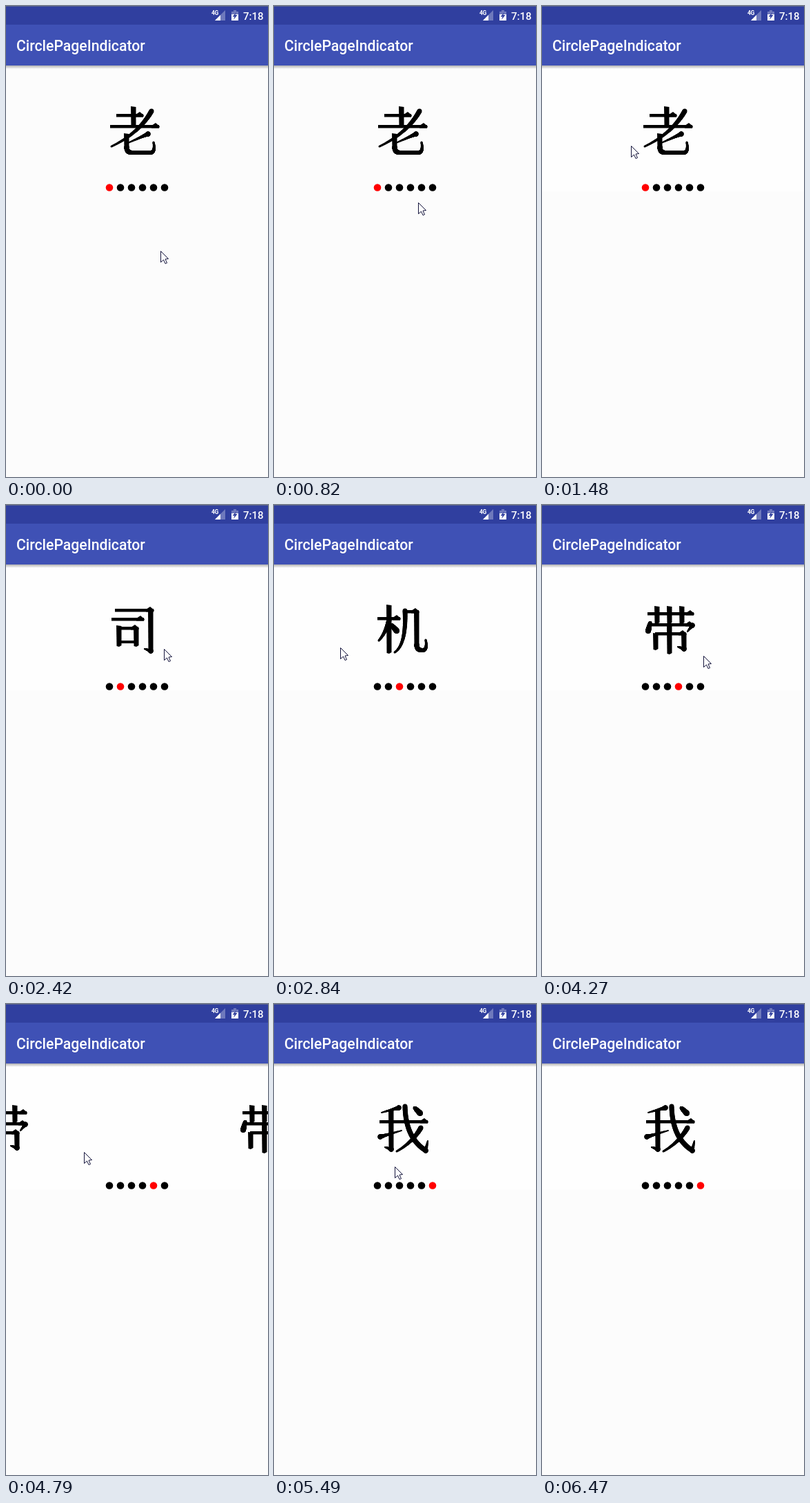
An HTML page with a canvas that plays this animation: 380 px wide and 681 px high, repeating every 7.64 s.

```html
<!DOCTYPE html>
<html lang="en">
<head>
<meta charset="utf-8">
<title>CirclePageIndicator</title>
<style>
  html, body { margin: 0; width: 100%; height: 100%; overflow: hidden; background: #fcfcfc; }
  canvas { position: absolute; left: 0; top: 0; display: block; }
  .label { position: absolute; color: #fff; white-space: nowrap; line-height: 1; font-family: Roboto, sans-serif; font-weight: 500; }
  #title { left: 15px; top: 47px; font-size: 21.2px; }
  #clock { left: 344px; top: 8px; font-size: 15px; }
  #net { left: 298px; top: 6px; font-size: 8.5px; font-weight: 700; letter-spacing: -0.5px; }
</style>
</head>
<body>
<canvas id="stage" width="380" height="681" role="img" aria-label="老司机带带我"></canvas>
<div class="label" id="title">CirclePageIndicator</div>
<div class="label" id="net">4G</div>
<div class="label" id="clock">7:18</div>
<script>
const W = 380, H = 681, LOOP = 7640, STEP = 140, SLIDE = 200;
const ctx = document.getElementById('stage').getContext('2d');

// The screen refreshes in bursts: [first, last]
const bursts = [[400, 1360], [1480, 2050], [2420, 3380], [3540, 4270], [4550, 5490], [5630, 6470]];
const slides = [1468, 2460, 3590, 4580, 5299];

// Turning points of the pointer: [time, x, y]
const turns = [
  [260, 224, 354], [810, 209, 284], [1360, 257, 214], [1480, 129, 202], [2050, 284, 212],
  [2420, 229, 208], [2800, 95, 206], [3380, 257, 210], [3540, 134, 204], [4270, 234, 218],
  [4720, 110, 214], [5100, 250, 224], [5490, 175, 235], [5910, 345, 460], [6470, 285, 700]
];

const ease = f => { f = Math.min(1, Math.max(0, f)); return f * f * (3 - 2 * f); };
const mix = (a, b, f) => a + (b - a) * f;

// Time of the latest screen refresh
function refresh(time) {
  const burst = bursts.filter(b => b[0] <= time).pop();
  if (!burst) return 0;
  const [a, b] = burst, n = Math.round((b - a) / STEP), gap = (b - a) / n;
  return Math.round((a + Math.min(n, Math.floor((time - a) / gap + .02)) * gap) / 10) * 10;
}

function pointerAt(t) {
  const i = Math.max(1, turns.findIndex(k => k[0] > t));
  if (t >= turns[turns.length - 1][0]) return [0, H + 20];
  const [t0, x0, y0] = turns[i - 1], [t1, x1, y1] = turns[i];
  const f = ease((t - t0) / (t1 - t0));
  return [mix(x0, x1, f), mix(y0, y1, f)];
}

const scrollAt = t => slides.reduce((sum, s) => sum + W * ease((t - s) / SLIDE), 0);

function poly(color, ...p) {
  ctx.fillStyle = color;
  ctx.beginPath();
  for (let i = 0; i < p.length; i += 2) ctx.lineTo(p[i], p[i + 1]);
  ctx.closePath();
  ctx.fill();
}

function rect(color, x, y, w, h) {
  ctx.fillStyle = color;
  ctx.fillRect(x, y, w, h);
}

function disc(color, x, y, r) {
  ctx.fillStyle = color;
  ctx.beginPath();
  ctx.arc(x, y, r, 0, Math.PI * 2);
  ctx.fill();
}

// Brush strokes of the characters
function brush(w0, w1, x0, y0, cx, cy, x1, y1) {
  for (let f = 0; f <= 1; f += 1 / 64)
    disc('#000', mix(mix(x0, cx, f), mix(cx, x1, f), f), mix(mix(y0, cy, f), mix(cy, y1, f), f), mix(w0, w1, f) / 2);
}
const sweep = (...p) => brush(7, 3, ...p);
const flick = (x0, y0, x1, y1) => brush(7, 2, x0, y0, x0, y0, x1, y1);
const dab = (x0, y0, x1, y1) => brush(4, 8, x0, y0, x0, y0, x1, y1);
function across(x0, x1, y) {
  rect('#000', x0, y - 2, x1 - x0, 4.5);
  poly('#000', x1 - 11, y - 1, x1 - 5, y - 5, x1 + 1, y, x1, y + 2.5, x1 - 11, y + 2.5);
}
function down(x, y0, y1) {
  poly('#000', x - 4, y0, x + 3.5, y0 + 1, x + 3.5, y1 - 1, x, y1 + 1, x - 3.5, y1);
}
function hook(x, y0, y1) {
  down(x, y0, y1);
  flick(x, y1, x - 9, y1 - 3);
}
function bend(x, y0, y1, right) {
  down(x, y0, y1 - 6);
  brush(7, 6, x, y1 - 8, x, y1, x + 8, y1);
  rect('#000', x + 7, y1 - 3, right - x - 12, 6);
  brush(6, 3, right - 6, y1, right + 2, y1, right - 1, y1 - 15);
}

function lao() {
  down(35, 1, 30);
  across(10, 49, 14);
  across(1, 72, 30);
  sweep(61, 8, 43, 40, 3, 59);
  flick(56, 41, 27, 54);
  bend(25, 40, 68, 65);
}

function si() {
  across(8, 64, 8);
  hook(60, 7, 67);
  across(3, 50, 21);
  down(14, 30, 60);
  across(14, 42, 34);
  down(39, 33, 60);
  rect('#000', 14, 52, 25, 4);
}

function ji() {
  across(0, 33, 20);
  down(17, 0, 70);
  sweep(17, 22, 12, 41, 2, 52);
  dab(20, 29, 28, 38);
  sweep(40, 9, 42, 58, 25, 69);
  across(40, 60, 10);
  bend(57, 10, 66, 71);
}

function dai() {
  across(3, 70, 13);
  for (const x of [17, 35, 53]) down(x, 2, 27);
  dab(7, 26, 4, 38);
  across(5, 69, 29);
  flick(68, 30, 61, 39);
  across(14, 59, 42);
  down(15, 41, 65);
  hook(56, 42, 64);
  down(35, 30, 71);
}

function wo() {
  flick(29, 6, 4, 13);
  across(1, 71, 26);
  hook(18, 9, 66);
  flick(2, 48, 33, 39);
  brush(7, 7, 38, 4, 39, 49, 67, 67);
  flick(68, 68, 71, 54);
  sweep(61, 35, 49, 56, 26, 69);
  dab(52, 6, 60, 14);
}

const pages = [lao, si, ji, dai, dai, wo];

function drawBars() {
  const shade = ctx.createLinearGradient(0, 86, 0, 91);
  shade.addColorStop(0, 'rgba(0,0,0,.3)');
  shade.addColorStop(1, 'rgba(0,0,0,0)');
  rect(shade, 0, 86, W, 5);
  rect('#303f9f', 0, 0, W, 27);
  rect('#565f8e', 0, 0, W, 1);
  rect('#3f51b5', 0, 27, W, 59);

  const dim = 'rgba(255,255,255,.3)';
  poly(dim, 303, 21, 318, 6, 318, 21);
  poly('#fff', 303, 21, 311, 13, 311, 21);
  rect(dim, 330, 6, 4, 2);
  rect(dim, 327, 8, 10, 4);
  rect('#fff', 327, 12, 10, 9);
  poly('#303f9f', 334, 9, 328.5, 15.5, 331.5, 15.5, 330, 20, 335.5, 13, 332.5, 13);
}

function drawPointer(x, y) {
  ctx.save();
  ctx.translate(x + .5, y + .5);
  poly('#fff', 0, 0, 0, 16, 4, 12.5, 6.5, 18, 9, 17, 6.5, 11.5, 11, 11);
  ctx.strokeStyle = '#14143c';
  ctx.lineWidth = 1;
  ctx.stroke();
  ctx.restore();
}

function draw(time) {
  const t = refresh(time), scroll = scrollAt(t), current = Math.round(scroll / W);
  rect('#fcfcfc', 0, 0, W, H);
  if (t >= slides[0]) rect('#fefefe', 0, 86, W, 182);
  drawBars();

  pages.forEach((glyph, i) => {
    disc(i === current ? '#f00' : '#000', 150 + i * 16, 262.5, 5.3);
    const left = Math.round(i * W - scroll);
    if (Math.abs(left) >= W) return;
    ctx.save();
    ctx.translate(150 + left, 144);
    glyph();
    ctx.restore();
  });

  drawPointer(...pointerAt(t).map(Math.round));
}

const start = performance.now();
function tick() {
  draw((performance.now() - start) % LOOP);
  requestAnimationFrame(tick);
}
tick();
</script>
</body>
</html>
```
